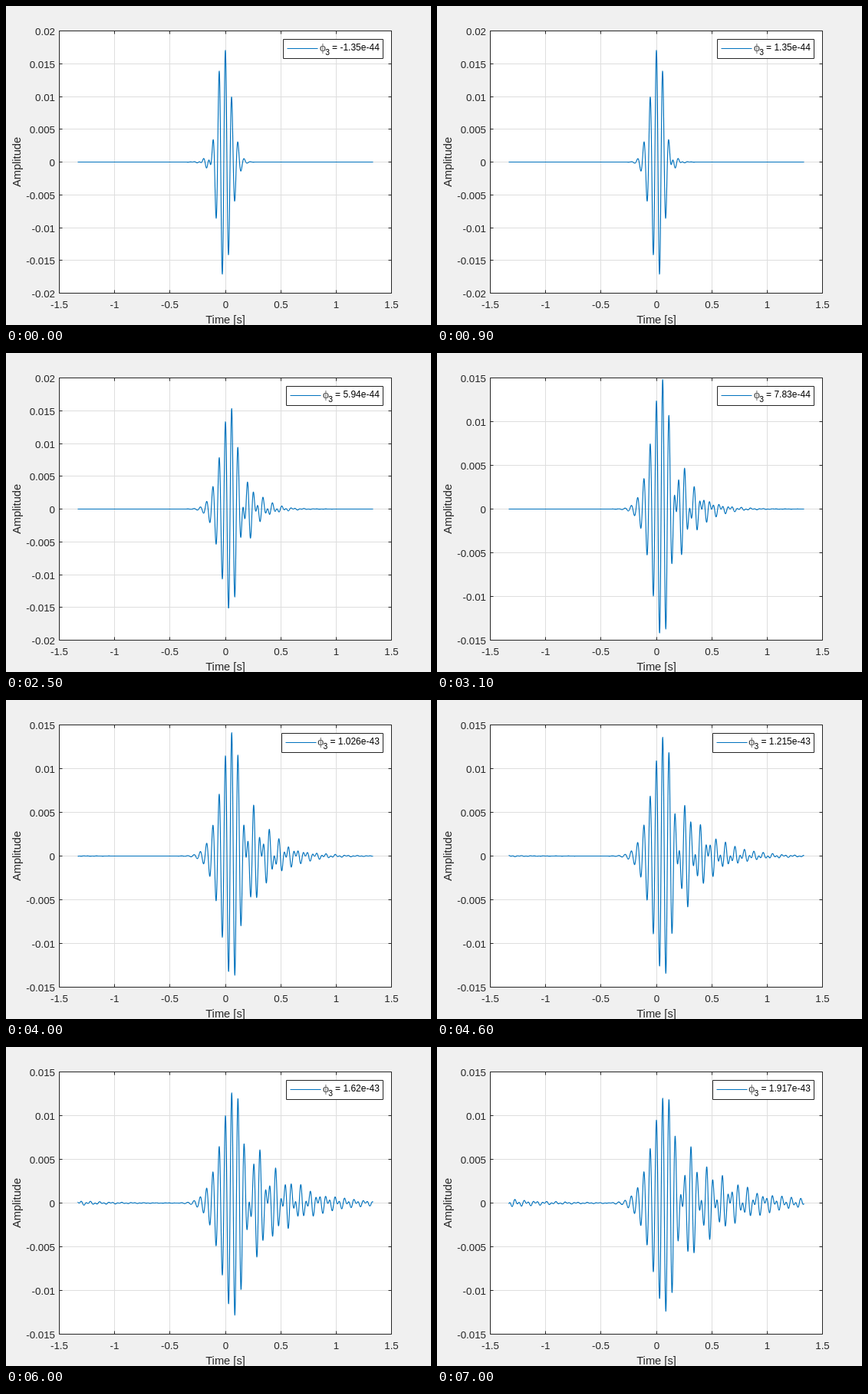
These frames come from a looping animation (554 px wide and 416 px high, 7100 ms). An HTML page with a canvas:

```html
<!DOCTYPE html>
<html lang="en">
<head>
<meta charset="utf-8">
<title>Third-order dispersion of a pulse</title>
<style>
html, body { margin: 0; width: 100%; height: 100%; overflow: hidden; background: #f0f0f0; }
canvas { display: block; }
</style>
</head>
<body>
<canvas id="plot" width="554" height="416"></canvas>
<script>
const ctx = document.getElementById('plot').getContext('2d');
const SANS = '"Liberation Sans", Arial, sans-serif';
const INK = '#262626', BLUE = '#0072bd';
const box = { left: 69.5, top: 32.5, right: 502.5, bottom: 374.5 };
const midX = 286, midY = 203.5, halfHeight = 171, scaleX = 433 / 3;

const SPAN = 8 / 3;          // length of the periodic time window
const CYCLES = 47;           // carrier cycles in the window
const WIDTH = 0.0563;        // pulse width without dispersion
const PEAK = 0.0187;
const STEP = 2 * Math.PI / SPAN;

// Envelope of a near-Gaussian spectrum with cubic phase, times the carrier.
function makePulse(phi) {
  const modes = [];
  for (let m = 1; m <= 34; m++) {
    const w = m * STEP, u = (w * WIDTH) ** 2;
    modes.push({ w, amp: 2 * Math.exp(-u / 2 - 0.021 * u * u), phase: 9.62e-5 * phi * w ** 3 / 6 });
  }
  const gain = PEAK * WIDTH * STEP / Math.sqrt(2 * Math.PI);
  return t => {
    let sum = 1;
    for (const { w, amp, phase } of modes) sum += amp * Math.cos(w * t - phase);
    return gain * sum * Math.cos(CYCLES * STEP * t);
  };
}

function line(x1, y1, x2, y2, color) {
  ctx.strokeStyle = color;
  ctx.beginPath();
  ctx.moveTo(x1, y1);
  ctx.lineTo(x2, y2);
  ctx.stroke();
}

function text(str, x, y, size, align, color = INK, font = SANS) {
  ctx.font = `${size}px ${font}`;
  ctx.textAlign = align;
  ctx.fillStyle = color;
  ctx.fillText(str, x, y);
}

const crisp = v => Math.round(v - 0.5) + 0.5;

function drawAxes(limit) {
  const { left, top, right, bottom } = box;
  ctx.lineWidth = 1;
  ctx.fillStyle = '#f0f0f0';
  ctx.fillRect(0, 0, 554, 416);
  ctx.fillStyle = '#fff';
  ctx.fillRect(left, top, right - left, bottom - top);

  const xs = [], ys = [];
  for (let i = -3; i <= 3; i++) xs.push([crisp(midX + i / 2 * scaleX), String(i / 2)]);
  const rows = Math.round(limit / 0.005);
  for (let i = -rows; i <= rows; i++) {
    ys.push([crisp(midY - i / rows * halfHeight), String(+(i * 0.005).toFixed(3))]);
  }
  for (const [x] of xs.slice(1, -1)) line(x, top, x, bottom, '#dedede');
  for (const [y] of ys.slice(1, -1)) line(left, y, right, y, '#dedede');
  for (const [x, label] of xs) {
    line(x, top, x, top + 4, INK);
    line(x, bottom, x, bottom - 4, INK);
    text(label, x, 394, 13.33, 'center');
  }
  for (const [y, label] of ys) {
    line(left, y, left + 4, y, INK);
    line(right, y, right - 4, y, INK);
    text(label, 64, y + 5, 13.33, 'right');
  }
  ctx.strokeStyle = INK;
  ctx.strokeRect(left, top, right - left, bottom - top);

  text('Time [s]', midX, 414, 14.67, 'center');
  ctx.save();
  ctx.translate(18.5, midY);
  ctx.rotate(-Math.PI / 2);
  text('Amplitude', 0, 0, 14.67, 'center');
  ctx.restore();
}

function drawCurve(phi, limit) {
  const pulse = makePulse(phi);
  ctx.strokeStyle = BLUE;
  ctx.lineWidth = 1.15;
  ctx.lineJoin = 'round';
  ctx.beginPath();
  for (let x = -192.5; x <= 192.5; x += 0.25) {
    ctx.lineTo(midX + x, midY - pulse(x / scaleX) / limit * halfHeight);
  }
  ctx.stroke();
}

function drawLegend(phi) {
  const label = ' = ' + Number((phi * 1e-44).toPrecision(5));
  ctx.font = `12px ${SANS}`;
  const start = 486.8 - ctx.measureText(label).width;
  const left = crisp(start - 60);
  ctx.lineWidth = 1;
  ctx.fillStyle = '#fff';
  ctx.fillRect(left, 43.5, 491.5 - left, 25);
  ctx.strokeStyle = INK;
  ctx.strokeRect(left, 43.5, 491.5 - left, 25);
  line(left + 5, 55.5, left + 45, 55.5, BLUE);
  ctx.font = `italic 12px serif`;
  text('ϕ', start - 13, 59, 12, 'left', '#333', '"Noto Serif", "DejaVu Serif", serif');
  text('3', start - 5.5, 64, 10.3, 'left', '#000');
  text(label, start, 58, 12, 'left', '#000');
}

let shown = -1;
function frame(now) {
  const tick = Math.floor(now % 7100 / 100);
  if (tick !== shown) {
    shown = tick;
    const phi = 0.27 * (Math.round(1.0866 * tick - 0.1) - 5);
    const limit = phi < 6 ? 0.02 : 0.015;
    drawAxes(limit);
    drawCurve(phi, limit);
    drawLegend(phi);
  }
  requestAnimationFrame(frame);
}
frame(performance.now());
</script>
</body>
</html>
```
